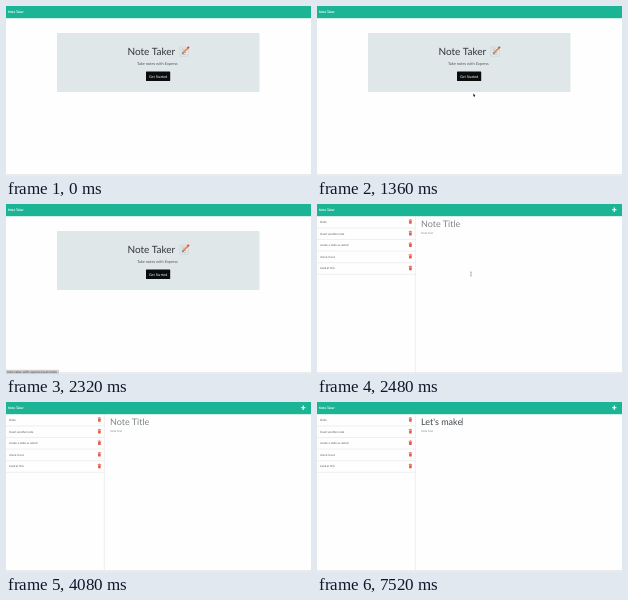
An HTML page that plays this animation: 305 by 170 pixels, repeating every 8000 ms.

```html
<!DOCTYPE html>
<html lang="en">
<head>
<meta charset="utf-8">
<title>Note Taker</title>
<style>
  html, body { margin: 0; width: 100%; height: 100%; overflow: hidden; background: #fefefe; }
  svg { display: block; width: 100%; height: 100%; }
  text { font-family: Lato, sans-serif; white-space: pre; text-rendering: geometricPrecision; }
  .brand { font-size: 3.25px; font-weight: 700; fill: #fff; }
  .heading { font-size: 10px; fill: #30363a; }
  .lead { font-size: 3.9px; fill: #50565a; }
  .button { font-size: 3.6px; fill: #fff; }
  .status { font-size: 3.2px; fill: #444; }
  .item { font-size: 2.9px; fill: #555; }
  .title { font-size: 9px; }
  .body { font-size: 2.8px; fill: #858b8d; }
  .rule { stroke: #dedede; stroke-width: .5; }
</style>
</head>
<body>
<svg viewBox="0 0 305 170">
  <rect width="305" height="170" fill="#fefefe"/>
  <rect width="305" height="12.2" fill="#1bb495"/>
  <text class="brand" x="2" y="7.3">Note Taker</text>
  <path d="M0 169H305" stroke="#cdcdcd" stroke-width=".8"/>

  <g id="home">
    <rect x="51" y="27" width="202.5" height="59" rx=".8" fill="#e0e7e9"/>
    <text class="heading" x="121.5" y="48.5">Note Taker</text>
    <g id="memo">
      <path d="M174 41.2h8v8.8h-8z" fill="#f3f5f6" stroke="#b3babd" stroke-width=".5"/>
      <path d="M175.2 43h4M175.2 44.8h3M175.2 46.6h5.4M175.2 48.3h5.4" stroke="#8f999e" stroke-width=".6"/>
      <path d="M177.2 46.8L182 41.8" stroke="#d98a56" stroke-width="1.7"/>
      <path d="M181.6 42.2L183 40.8" stroke="#cf4a50" stroke-width="1.8"/>
      <path d="M176.2 47.9l.5-1.7 1.1 1.2z" fill="#444"/>
    </g>
    <text class="lead" x="131" y="59.2">Take notes with Express</text>
    <rect x="140" y="65.5" width="24.2" height="9.5" rx=".6" fill="#090d0d"/>
    <text class="button" x="152.1" y="71.6" text-anchor="middle">Get Started</text>
    <g id="status">
      <rect y="165.8" width="53" height="4.2" fill="#cfcfcf"/>
      <text class="status" x="1" y="169">note-taker-with-express.local/notes</text>
    </g>
  </g>

  <g id="notes">
    <path d="M297.3 3.6v4.4M295.1 5.8h4.4" stroke="#fff" stroke-width="1.1"/>
    <path class="rule" d="M98.3 12.2V168.6"/>
    <g id="list"></g>
    <text class="title" id="title" x="104" y="22.7"></text>
    <text class="body" x="104.2" y="30">Note Text</text>
    <path id="caret" d="M0 15.8V23.4" stroke="#333" stroke-width=".5"/>
  </g>

  <path id="arrow" d="M0 0v3l.7-.6.5 1 .5-.3-.5-.9h.9z" fill="#111"/>
  <path id="beam" d="M-.7 -2h1.4M0 -2v4M-.7 2h1.4" fill="none" stroke="#666" stroke-width=".45"/>
</svg>
<script>
  const LOOP = 8000, STEP = 80;
  const OPEN_NOTES = 2480, FOCUS = 3520, TYPE = 6080;
  const el = id => document.getElementById(id);
  const show = (id, on) => el(id).setAttribute('visibility', on ? 'visible' : 'hidden');
  const place = (id, x, y) => el(id).setAttribute('transform', `translate(${x} ${y})`);

  const items = ['Hello', 'Insert another note', 'create a todo as noted', 'check it out', 'Look at this'];
  el('list').innerHTML = items.map((item, i) => `
    <g transform="translate(0 ${i * 11.6})">
      <text class="item" x="3" y="19">${item}</text>
      <path d="M91.7 16.1h3.4M92.8 15.6h1.2" stroke="#e25747" stroke-width=".7"/>
      <path d="M92 16.8h2.8l-.2 3h-2.4z" fill="#e25747"/>
      <path class="rule" d="M0 23.9H98.3"/>
    </g>`).join('');

  // Time, x, y of the pointer
  const route = [
    [80, 205, 101], [720, 156.5, 88.5], [1280, 156.5, 88.5], [1840, 154, 70],
    [2480, 154, 70], [2880, 160, 71.5], [3360, 128, 21.3]
  ];
  // Time and length of the typed title
  const typed = "Let's make";
  const keys = [[6080, 1], [6320, 2], [6400, 3], [6480, 4], [6800, 5], [6960, 6], [7280, 7], [7440, 9], [7520, 10]];

  function pointerAt(t) {
    const next = route.findIndex(p => p[0] > t);
    if (next < 0) return route[route.length - 1].slice(1);
    if (next === 0) return route[0].slice(1);
    const [t0, x0, y0] = route[next - 1], [t1, x1, y1] = route[next];
    const u = (t - t0) / (t1 - t0), e = u * u * (3 - 2 * u);
    return [x0 + (x1 - x0) * e, y0 + (y1 - y0) * e];
  }

  function caretOn(t) {
    if (t >= TYPE) return true;
    return t >= FOCUS && Math.floor((t - FOCUS + 20) / 500) % 2 === 0;
  }

  function draw(now) {
    const t = Math.floor(now % LOOP / STEP) * STEP;
    const onNotes = t >= OPEN_NOTES;
    show('home', !onNotes);
    show('notes', onNotes);
    show('status', !onNotes && t >= 2080);
    el('status').setAttribute('opacity', Math.min(1, (t - 2000) / 240));

    const title = el('title');
    const length = keys.reduce((n, [at, count]) => t >= at ? count : n, 0);
    title.textContent = length ? typed.slice(0, length) : 'Note Title';
    title.setAttribute('fill', length ? '#42484d' : '#7f8587');
    place('caret', 104.2 + (length ? title.getComputedTextLength() : 0), 0);
    show('caret', onNotes && caretOn(t));

    const [x, y] = pointerAt(t);
    place('arrow', x, y);
    place('beam', x, y);
    show('arrow', t >= 80 && !onNotes);
    show('beam', onNotes && t < 4000);
  }

  const start = performance.now();
  function tick() {
    draw(performance.now() - start);
    requestAnimationFrame(tick);
  }
  tick();
</script>
</body>
</html>
```
